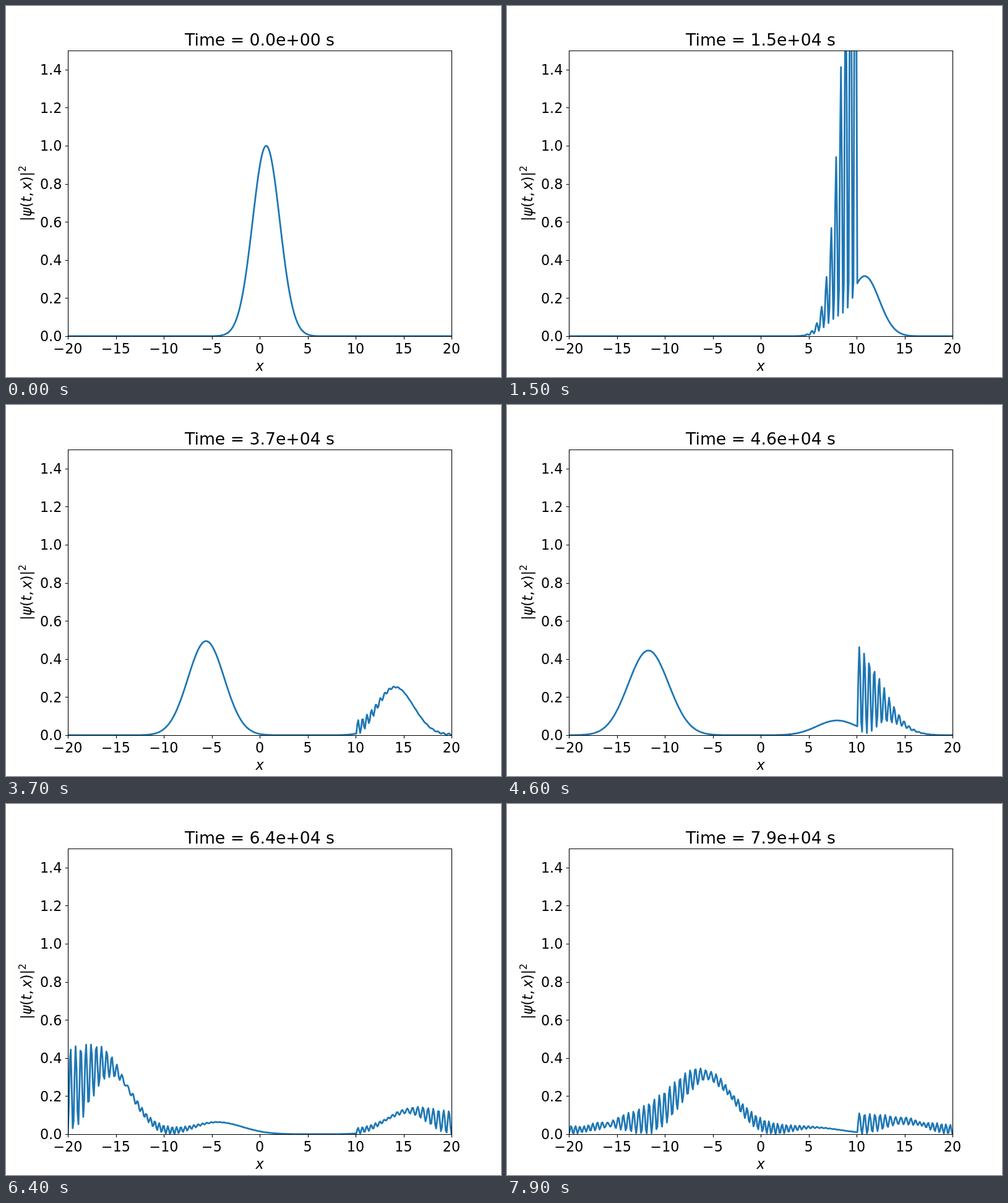
An HTML page for the animation above (8 s loop, 800x600 px).

```html
<!DOCTYPE html>
<html lang="en">
<head>
<meta charset="utf-8">
<title>Wave packet and barrier</title>
<style>
  html, body { margin: 0; width: 100%; height: 100%; overflow: hidden; background: #fff; }
  svg { display: block; }
  text { font: 22.22px "DejaVu Sans", sans-serif; text-anchor: middle; }
  .end { text-anchor: end; }
  #title { font-size: 26.67px; }
  .var { font-style: italic; }
  #axes { fill: none; stroke: #000; stroke-width: 1.11; }
  #curve { fill: none; stroke: #1f77b4; stroke-width: 2.78; stroke-linejoin: round; stroke-linecap: square; }
</style>
</head>
<body>
<svg width="800" height="600" viewBox="0 0 800 600">
  <clipPath id="plot"><rect x="100" y="72" width="620" height="462"/></clipPath>
  <g clip-path="url(#plot)"><polyline id="curve"/></g>
  <path id="axes"/>
  <g id="labels"></g>
  <text id="title" x="410" y="64"></text>
  <text class="var" x="410" y="590">x</text>
  <text transform="translate(40.5 303) rotate(-90)">|<tspan class="var">ψ</tspan>(<tspan class="var">t</tspan>,<tspan class="var" dx="4">x</tspan>)|<tspan dy="-9" font-size="15.56" style="font-size:15.56px">2</tspan></text>
</svg>
<script>
const $ = id => document.getElementById(id);
const px = x => 410 + 15.5 * x;
const py = y => 534 - 308 * y;

// Axes, ticks and tick labels
let path = 'M100.5 72.5H720.5V534.5H100.5Z', labels = '';
for (let x = -20; x <= 20; x += 5) {
  path += `M${Math.round(px(x)) + .5} 534.5v4.86`;
  labels += `<text x="${px(x)}" y="562">${String(x).replace('-', '−')}</text>`;
}
for (let i = 0; i < 8; i++) {
  const y = py(i / 5);
  path += `M100.5 ${Math.round(y) + .5}h-4.86`;
  labels += `<text class="end" x="90.3" y="${y + 8.3}">${(i / 5).toFixed(1)}</text>`;
}
$('axes').setAttribute('d', path);
$('labels').innerHTML = labels;

// Schrödinger equation for an electron on a grid with hard walls (SI units)
const FRAMES = 80, FRAME_MS = 100, STEPS = 200;
const N = 400, DX = 40 / (N - 1), BARRIER = 300;
const HBAR = 1.054572e-34, MASS = 9.109384e-31;
const DT = 1000 / STEPS;                       // 1000 s pass per frame
const hop = HBAR / (2 * MASS * DX * DX);
const wall = 1e-36 / HBAR;
const re = new Float64Array(N), im = new Float64Array(N);
for (let i = 1; i < N - 1; i++) {
  const x = -20 + i * DX, a = Math.exp(-x * x / 8);
  re[i] = a * Math.cos(2 * Math.PI * x);
  im[i] = a * Math.sin(2 * Math.PI * x);
}

// to += dt * H from
function push(to, from, dt) {
  const h = hop * dt;
  for (let i = 1; i < N - 1; i++) to[i] += h * (2 * from[i] - from[i - 1] - from[i + 1]);
  to[BARRIER] += wall * dt * from[BARRIER];
}

function advance() {
  push(im, re, -DT / 2);
  for (let s = 0; s < STEPS; s++) {
    push(re, im, DT);
    push(im, re, -DT);
  }
  push(im, re, DT / 2);
}

const curves = Array.from({ length: FRAMES }, () => {
  advance();
  return Array.from(re, (r, i) =>
    px(-20 + i * DX).toFixed(2) + ',' + py(r * r + im[i] * im[i]).toFixed(2)).join(' ');
});

function timeText(n) {
  const [mantissa, power] = (n * 1000).toExponential(1).split('e+');
  return `Time = ${mantissa}e+0${power} s`;
}

let shown = -1;
function draw(n) {
  if (n === shown) return;
  shown = n;
  $('curve').setAttribute('points', curves[n]);
  $('title').textContent = timeText(n);
}

const start = performance.now();
function tick() {
  draw(Math.floor((performance.now() - start) / FRAME_MS) % FRAMES);
  requestAnimationFrame(tick);
}
tick();
</script>
</body>
</html>
```
